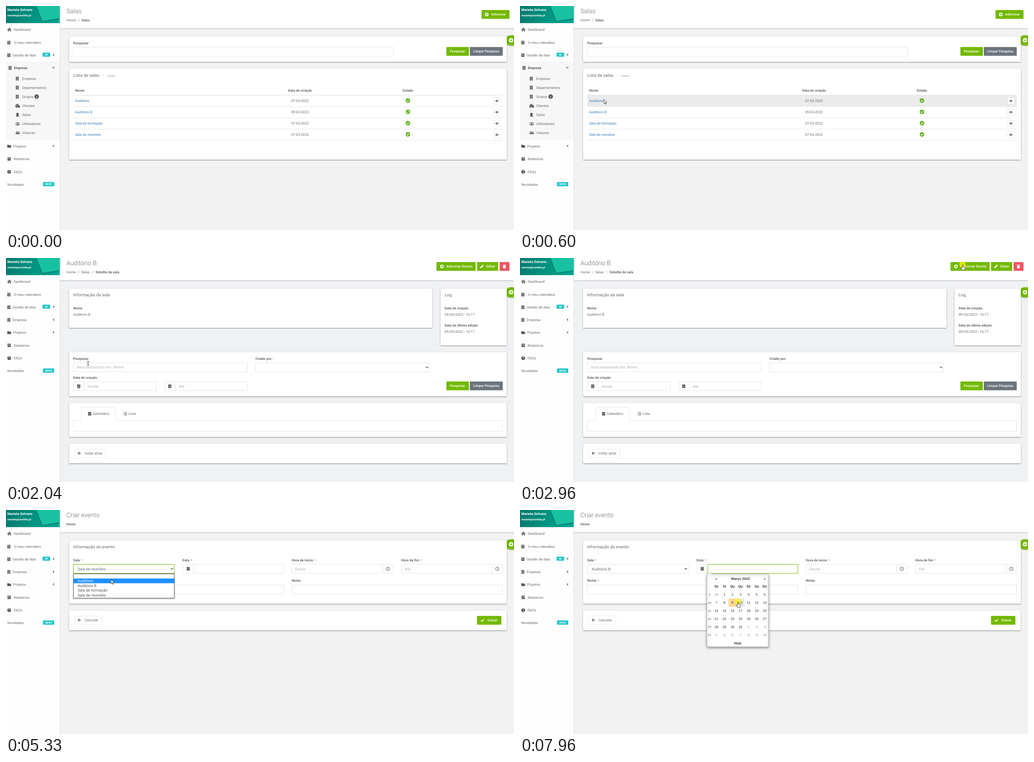
An HTML page with a canvas that plays this animation: 1127x497 px, repeating every 8 s.

```html
<!DOCTYPE html>
<html lang="pt">
<head>
<meta charset="utf-8">
<style>
html, body { margin: 0; width: 100%; height: 100%; overflow: hidden; background: #f2f2f2; }
canvas { display: block; }
</style>
</head>
<body>
<canvas id="stage" width="1127" height="497"></canvas>
<script>
const c = document.getElementById('stage').getContext('2d');
const LOOP = 8000;
const GREEN = '#73b900', TEAL = '#23c6c8', GREY = '#676a6c', DARK = '#55585b', EDGE = '#e4e5e7', HINT = '#b2b4b6';
const ROOMS = ['Auditório', 'Auditório B', 'Sala de formação', 'Sala de reuniões'];

// Icons are centred on 0,0
const ICONS = {
  home: 'M-5 .2L0-4.3 5 .2 4.2 1 0-2.8-4.2 1ZM-3.4 1.2L0-1.9 3.4 1.2V4.2H1V1.6H-1V4.2H-3.4Z',
  calendar: 'M-3.5-3.2H-2.4V-4.3H-1.2V-3.2H1.2V-4.3H2.4V-3.2H3.5V-1.6H-3.5ZM-3.5-1H3.5V4H-3.5ZM-2 .8V1.8H2V.8Z',
  days: 'M-3.5-3.2H-2.4V-4.3H-1.2V-3.2H1.2V-4.3H2.4V-3.2H3.5V-1.6H-3.5ZM-3.5-1H3.5V4H-3.5Z' +
    [-2.5, -.5, 1.5].map(x => `M${x} 0h1v1h-1zM${x} 2h1v1h-1z`).join(''),
  building: 'M-3.2 4.2V-4.2H3.2V4.2H.7V2.4H-.7V4.2Z' +
    [-3, -1, 1].map(y => `M-1.8 ${y}h1.2v1h-1.2zM.6 ${y}h1.2v1h-1.2z`).join(''),
  city: 'M-5 4V-2H-2.5V-4H1.5V-1H5V4ZM-3.8-.8v1h1v-1zM-3.8 1.4v1h1v-1zM-1-2.6v1h1v-1zM-1-.4v1h1v-1zM-1 1.8v1h1v-1zM2.6.6v1h1v-1z',
  door: 'M-3-4H2V3.2H4.5V4H-4.5V3.2H-3ZM.3-.5v1h1v-1z',
  users: 'M-1.6-2a1.6 1.6 0 1 0 3.2 0a1.6 1.6 0 1 0-3.2 0M-4.6-1.6a1.1 1.1 0 1 0 2.2 0a1.1 1.1 0 1 0-2.2 0M2.4-1.6a1.1 1.1 0 1 0 2.2 0a1.1 1.1 0 1 0-2.2 0M-2.8 3.5Q-2.6.3 0 .3T2.8 3.5ZM-5 2V.8Q-4 0-2.8.6L-3.3 2ZM5 2V.8Q4 0 2.8.6L3.3 2Z',
  car: 'M-4.5 0L-3.6-.6-2.6-3H2.6L3.6-.6 4.5 0V2.5H3.8V3.6H2.2V2.5H-2.2V3.6H-3.8V2.5H-4.5ZM-2.4-.6H2.4L1.8-2H-1.8ZM-3.4.6v.9h1.2v-.9zM2.2.6v.9h1.2v-.9z',
  folder: 'M-4.2-3H-.9L.2-1.9H4.2V3.2H-4.2Z',
  archive: 'M-4-3.6H4V-1.8H-4ZM-3.6-1.2H3.6V3.6H-3.6ZM-1.3-.5V.4H1.3V-.5Z',
  pencil: 'M-4 4L-3.5 1.4 1.2-3.3 3.3-1.2-1.4 3.5ZM1.8-3.9L2.6-4.5 4.5-2.6 3.9-1.8Z',
  trash: 'M-3.6-3.6H-1.2L-.7-4.2H.7L1.2-3.6H3.6V-2.6H-3.6ZM-3.1-2H3.1L2.7 4.2H-2.7Z',
  eye: 'M-4 0Q0-5 4 0Q0 5-4 0ZM-3-0Q0 3.6 3 0Q0-3.6-3 0ZM-1.3 0a1.3 1.3 0 1 0 2.6 0a1.3 1.3 0 1 0-2.6 0'
};
const LINES = {
  left: 'M1.3-2.4L-1.1 0 1.3 2.4', down: 'M-2.4-1.1L0 1.3 2.4-1.1',
  back: 'M3.4 0H-3M0-3L-3 0 0 3', check: 'M-3.5 .2L-1.2 2.5 3.5-2.3', tick: 'M-2.4 .1L-.7 1.8 2.4-1.5',
  plus: 'M-2.5 0H2.5M0-2.5V2.5', clock: 'M-4 0a4 4 0 1 0 8 0a4 4 0 1 0-8 0M0-2.3V.3L1.5 1.4',
  list: 'M-4-2.8H-2.7M-1.5-2.8H4M-4 0H-2.7M-1.5 0H4M-4 2.8H-2.7M-1.5 2.8H4'
};
const POINTERS = {
  arrow: 'M0 0V9.5L2.2 7.6 3.8 11 5.3 10.3 3.8 7H6.7Z',
  hand: 'M-1 .8Q0-.8 1 .8V4.4L4.4 5.2Q5.6 6 5.3 8L4.4 12H-1.5L-4 8.2Q-4 6.4-2.6 7L-1 8.2Z',
  beam: 'M-2.5-4.3Q0-4.3 0-3V3Q0 4.3-2.5 4.3M2.5-4.3Q0-4.3 0-3M0 3Q0 4.3 2.5 4.3'
};

function shape(d, x, y, fill, stroke, width = 1) {
  const p = new Path2D(d);
  c.save();
  c.translate(x, y);
  if (fill) { c.fillStyle = fill; c.fill(p, 'evenodd'); }
  if (stroke) { c.strokeStyle = stroke; c.lineWidth = width; c.stroke(p); }
  c.restore();
}
const icon = (name, x, y, color = DARK) => shape(ICONS[name], x, y, color);
const line = (name, x, y, color = DARK, width = 1.3) => shape(LINES[name], x, y, null, color, width);

function text(s, x, y, { size = 7.75, weight = 400, color = GREY, align = 'left', font = 'Roboto' } = {}) {
  c.font = `${weight} ${size}px ${font}, sans-serif`;
  c.textAlign = align;
  c.fillStyle = color;
  c.fillText(s, x, y + size * .355);
  return c.measureText(s).width;
}
const bold = (s, x, y, more) => text(s, x, y, { weight: 700, size: 7.6, ...more });
const field = (s, x, y, color = HINT) => text(s, x, y, { size: 8.5, color });

function rect(x0, y0, x1, y1, fill, stroke, radius = 0) {
  const o = stroke ? .5 : 0;
  c.beginPath();
  c.roundRect(x0 + o, y0 + o, x1 - x0 - 2 * o, y1 - y0 - 2 * o, radius);
  if (fill) { c.fillStyle = fill; c.fill(); }
  if (stroke) { c.strokeStyle = stroke; c.lineWidth = 1; c.stroke(); }
}
function dot(x, y, r, color) {
  c.beginPath();
  c.arc(x, y, r, 0, 7);
  c.fillStyle = color;
  c.fill();
}
function shadowed(color, blur, dy, draw) {
  c.save();
  c.shadowColor = color; c.shadowBlur = blur; c.shadowOffsetY = dy;
  draw();
  c.restore();
}
const card = (x0, y0, x1, y1) => shadowed('rgba(0,0,0,.45)', 2.5, 1, () => rect(x0, y0, x1, y1, '#fff', null, 1));
const input = (x0, y0, x1, y1, edge = EDGE) => rect(x0, y0, x1, y1, '#fff', edge);

function button(x0, y0, x1, label, textX, color = GREEN) {
  rect(x0, y0, x1, y0 + 19.5, color, null, 1.5);
  text(label, textX, y0 + 9.7, { color: '#fff', weight: 500, size: 7.65 });
}
function outlineButton(y, x1, label) {
  rect(152, y, x1, y + 20, '#fff', '#e7eaec', 1.5);
  line('back', 163, y + 9.7);
  text(label, 174, y + 9.7);
}
function plusCircle(x, y, r) {
  dot(x, y, r, '#fff');
  line('plus', x, y, GREEN);
}
function badge(s, x0, y0, x1, y1) {
  rect(x0, y0, x1, y1, TEAL, null, 1.5);
  bold(s, (x0 + x1) / 2, (y0 + y1) / 2, { size: 5.6, color: '#fff', align: 'center' });
}
function roundLetter(s, x, y, r) {
  dot(x, y, r, DARK);
  bold(s, x, y, { size: r * 1.5, color: '#fff', align: 'center' });
}

function userPanel() {
  const g = c.createLinearGradient(0, 0, 119, 38);
  g.addColorStop(0, '#00796c');
  g.addColorStop(.55, '#009583');
  g.addColorStop(1, '#00a693');
  rect(0, 0, 119, 38, g);
  shadowed('rgba(0,60,50,.5)', 4, 1, () => shape('M67-2H119V27L81 33Z', 0, 0, '#19c1a3'));
  bold('Marieta Solvano', 3, 8, { color: '#fff' });
  bold('marieta@vorbita.pt', 3, 20.5, { size: 6.1, color: '#fff' });
}

function sidebar(open) {
  rect(0, 0, 119, 497, '#fefefe');
  rect(119, 0, 120, 497, '#dedfe0');
  userPanel();
  icon('home', 7.5, 52); text('Dashboard', 17, 52);
  icon('calendar', 6.3, 81); text('O meu calendário', 17.5, 81);
  icon('calendar', 6.3, 109); text('Gestão de dias', 15, 109);
  badge('46', 81, 103.5, 98, 112.5);
  line('left', 105.5, 108);
  if (open) {
    rect(0, 123, 119, 297, '#f7f7f7');
    icon('building', 9, 137.5); bold('Empresa', 17.5, 137.5, { color: DARK });
    line('down', 105, 136.5);
    [['building', 'Empresa'], ['building', 'Departamentos'], ['building', 'Grupos'], ['city', 'Clientes'],
     ['door', 'Salas'], ['users', 'Utilizadores'], ['car', 'Viaturas']].forEach(([name, label], i) => {
      const y = 161.3 + 20 * i;
      icon(name, i < 3 ? 25 : 26, y);
      text(label, 36, y);
    });
    roundLetter('i', 68, 201, 5);
  } else {
    icon('building', 6.3, 137.5); text('Empresa', 15, 137.5);
    line('left', 105.5, 136.8);
  }
  const y = open ? 311 : 165.5;
  icon('folder', 7, y); text('Projetos', 16, y);
  line('left', 105.5, y - .5);
  icon('archive', 7, y + 28.3); text('Relatórios', 17, y + 28.3);
  roundLetter('?', 7, y + 56.8, 4.1); text("FAQ's", 17, y + 56.8);
  text('Novidades', 3, y + 85);
  badge('NOVO', 82, y + 79.5, 107, y + 89);
}

function frame(title, crumbs, open, bg) {
  rect(0, 0, 1127, 497, bg);
  shadowed('rgba(0,0,0,.22)', 3, 1, () => rect(120, -5, 1127, 49, '#fff'));
  sidebar(open);
  text(title, 134, 11.5, { size: 14, weight: 300 });
  crumbs.forEach(([s, x], i) => (i == crumbs.length - 1 ? bold : text)(s, x, 31.5));
  shadowed('rgba(0,0,0,.25)', 3, 1, () => rect(1108, 65, 1140, 87.5, GREEN, null, 11));
  plusCircle(1120.5, 76, 4.8);
}
const heading = (s, x, y) => text(s, x, y, { size: 9.5 });
function searchButtons(y) {
  button(977, y, 1027, 'Pesquisar', 984.5);
  button(1029, y, 1102, 'Limpar Pesquisa', 1036.5, '#6c757d');
}

function listPage(mouse) {
  frame('Salas', [['Home', 134], ['/', 160], ['Salas', 167]], true, '#f2f2f2');
  button(1055, 9, 1117, 'Adicionar', 1076);
  plusCircle(1066.5, 18.7, 4);
  card(140, 68, 1111, 124);
  bold('Pesquisar', 149, 82);
  input(149, 91, 860, 112);
  searchButtons(91);
  card(140, 139, 1111, 341);
  heading('Lista de salas', 149, 153.5);
  dot(216, 154.5, .8, '#aaa');
  text('4 Salas', 223, 154.7, { size: 6, color: '#999' });
  bold('Nome', 153.5, 187);
  bold('Data de criação', 652.3, 187, { align: 'center' });
  bold('Estado', 891.7, 187, { align: 'center' });
  const hover = mouse ? Math.floor((mouse.y - 198) / 25) : -1;
  ROOMS.forEach((room, i) => {
    const y = 210.2 + 25 * i;
    if (i == hover) rect(149, 198 + 25 * i, 1102, 223 + 25 * i, '#ebebeb');
    text(room, 153.5, y, { color: '#337ab7' });
    text(i == 1 ? '09-03-2022' : '07-03-2022', 652.3, y, { align: 'center' });
    dot(891.7, y - .3, 5, '#62b01e');
    line('tick', 891.7, y - .3, '#fff', 1.4);
    rect(1081, y - 7, 1097, y + 8, '#fff', '#e7eaec', 1.5);
    icon('eye', 1089, y + .3, '#444');
  });
  for (let i = 0; i < 5; i++) rect(149, 197.5 + 25 * i, 1102, 198.5 + 25 * i, i ? '#e5e6e8' : '#d9dbdd');
}

function dateField(x0, x1, y, hint, edge = EDGE) {
  input(x0, y, x1, y + 21);
  rect(x0, y, x0 + 25, y + 21, '#fff', EDGE);
  if (edge != EDGE) rect(x0 + 24, y, x1, y + 21, null, edge);
  icon('days', x0 + 12.3, y + 10.5, '#444');
  field(hint, x0 + 32, y + 10.5);
}

function detailPage(complete) {
  frame('Auditório B', [['Home', 134], ['/', 167 - 7], ['Salas', 167], ['/', 191], ['Detalhe da sala', 199]], false,
    complete ? '#f0f1f3' : '#f2f2f2');
  button(955, 9, 1042, 'Adicionar Evento', 977);
  plusCircle(967, 18.7, 4);
  button(1045, 9, 1092, 'Editar', 1065.5);
  icon('pencil', 1056, 18.7, '#fff');
  button(1095, 9, 1117, '', 1100, '#ed5565');
  icon('trash', 1105.7, 18.7, '#fff');
  card(140, 68, 946, 155);
  heading('Informação da sala', 149, 82);
  bold('Nome', 149, 111.5);
  text('Auditório B', 149, 125.5);
  card(964, 68, 1111, 194);
  heading('Log', 973, 82);
  ['Data de criação', 'Data da última edição'].forEach((s, i) => {
    bold(s, 973, 111.5 + 38 * i);
    text('09/03/2022 - 16:17', 973, 125.5 + 38 * i);
  });
  card(140, 209, 1111, 307);
  bold('Pesquisar', 149, 223.5);
  input(149, 232, 536, 253);
  field('Será pesquisado em: Nome', 156.5, 242.3);
  bold('Criado por:', 553.5, 223.5);
  input(553, 232, 940, 253);
  line('down', 934, 242.3, '#444');
  bold('Data de criação', 149, 265.3);
  dateField(149, 334, 274, 'Desde');
  dateField(351, 536, 274, 'Até');
  searchButtons(274);
  card(140, 322, 1111, 397);
  input(149, 360, 1102, 385);
  rect(167, 331, 243, 362, '#fff', EDGE, 2);
  rect(168, 360, 242, 363, '#fff');
  icon('days', 185.5, 345.5, '#444');
  text('Calendário', 192, 345.5);
  line('list', 264.5, 345.5, '#444', 1.1);
  text('Lista', 271.5, 345.5);
  if (!complete) return;
  card(140, 412, 1111, 455.5);
  outlineButton(423.5, 222, 'Voltar atrás');
}

function required(label, x, y) {
  const w = bold(label, x, y);
  text('*', x + w + 3, y, { size: 6.5, color: '#c0392b' });
}
function timeField(x, hint) {
  input(x, 120, x + 226, 141);
  rect(x + 201, 120, x + 226, 141, '#fff', EDGE);
  field(hint, x + 7.5, 130.5);
  line('clock', x + 213, 130.5, DARK, 1);
}

function roomMenu(t) {
  const active = t < 5250 ? 3 : t < 5630 ? 0 : 1;
  shadowed('rgba(0,0,0,.3)', 3, 1, () => rect(149, 141, 374, 196, '#fff', '#666'));
  ROOMS.forEach((room, i) => {
    const y = 157 + 10.7 * i;
    if (i == active) rect(150, y - 5, 373.5, y + 5.6, '#1e90ff');
    field(room, 159, y, i == active ? '#fff' : '#555');
  });
}

function datePicker(mouse) {
  const put = (s, x, y, more) => text(s, x, y, { size: 7.6, color: '#333', align: 'center', font: '"Liberation Sans"', ...more });
  const colX = i => 435.7 + 17.87 * i, rowY = i => 187.5 + 17.9 * i;
  shadowed('rgba(0,0,0,.4)', 5, 2, () => rect(414, 142, 552, 304, '#fff', '#bbb', 2.5));
  shape('M417 143L421 139 425 143Z', 0, 0, '#fff', '#ccc', .6);
  rect(417, 142.6, 426, 144, '#fff');
  put('«', colX(0), 152, { weight: 700 });
  put('Março 2022', 489.3, 152, { weight: 700 });
  put('»', colX(6), 152, { weight: 700 });
  ['Se', 'Te', 'Qu', 'Qu', 'Se', 'Sa', 'Do'].forEach((s, i) => put(s, colX(i), 169.7, { weight: 700 }));
  for (let r = 0; r < 6; r++) {
    put(9 + r, 420.5, rowY(r) + .3, { size: 5.8 });
    for (let i = 0; i < 7; i++) {
      const n = r * 7 + i, x = colX(i), y = rowY(r);
      const over = mouse.y > 178 && Math.abs(mouse.x - x) < 8.9 && Math.abs(mouse.y - y) < 8.95;
      if (n == 9) rect(x - 9, y - 9, x + 9, y + 9, '#ffd898', null, 1.5);
      else if (over) rect(x - 9, y - 9, x + 9, y + 9, '#e9e9ec', null, 1.5);
      put(n < 1 ? 28 : n > 31 ? n - 31 : n, x, y, { color: n < 1 ? '#999' : n > 31 ? '#7f9c9c' : '#333' });
    }
  }
  put('Hoje', 483, 295, { weight: 700 });
}

function eventPage(t, mouse) {
  const picking = t >= 6870;
  const selectEdge = t >= 4460 && t < 6870 ? GREEN : picking && t < 7030 ? '#bfdc95' : EDGE;
  frame('Criar evento', [['Home', 134]], false, '#f2f2f2');
  card(140, 68, 1111, 208);
  heading('Informação do evento', 149, 82);
  [['Sala', 149], ['Data', 391.5], ['Hora de início', 634], ['Hora de fim', 877]].forEach(([s, x]) => required(s, x, 111.5));
  input(149, 120, 374, 141, selectEdge);
  field(t < 6090 ? 'Sala de reuniões' : 'Auditório B', 159, 130.5, GREY);
  line('down', 368, 130.3, '#444');
  dateField(392, 617, 120, '', picking ? GREEN : EDGE);
  timeField(634, 'Desde');
  timeField(877, 'Até');
  required('Nome', 149, 156.7);
  input(149, 166, 617, 187);
  bold('Notas', 634, 156.7);
  input(634, 166, 1102, 187);
  card(140, 223, 1111, 267);
  outlineButton(234.5, 213, 'Cancelar');
  button(1045, 235, 1099, 'Gravar', 1068);
  line('check', 1057, 244.5, '#fff', 1.7);
  if (t >= 4540 && t < 6090) roomMenu(t);
  if (picking) {
    if (t < 7400) rect(424, 125, 425, 136, '#333');
    datePicker(mouse);
  }
}

const TRACK = [[140, 215, 367], [215, 205, 285], [290, 198, 260], [460, 198, 258], [590, 186, 207], [780, 186, 207],
  [1080, 181, 234], [1950, 182, 234], [2060, 182, 234], [2730, 948, 22], [2810, 1022, 13], [2960, 982, 15], [3490, 982, 15],
  [3790, 341, 41], [3900, 341, 41], [4290, 245, 128], [4500, 240, 131], [5010, 239, 133], [5250, 234, 152], [5320, 233, 154],
  [5400, 233, 155], [5630, 231, 165], [6380, 231, 165], [6800, 441, 132], [7100, 441, 132], [7330, 462, 182],
  [7480, 486, 216], [7640, 484, 204], [8000, 484, 204]];
const KINDS = [[0, 'arrow'], [290, 'hand'], [460, 'arrow'], [1000, 'hand'], [1640, 'arrow'], [1950, 'beam'], [2110, 'arrow'],
  [2810, 'hand'], [3340, 'arrow'], [6720, 'beam'], [7180, 'hand']];
const CLICKS = [[1080, 1230], [2960, 3040], [4460, 4540], [6090, 6170], [6800, 6870], [7960, 8000]];

function mouseAt(t) {
  if (t < TRACK[0][0]) return null;
  const i = TRACK.findIndex(k => k[0] > t);
  const [t0, x0, y0] = TRACK[i - 1], [t1, x1, y1] = TRACK[i];
  const p = (t - t0) / (t1 - t0);
  return { x: x0 + (x1 - x0) * p, y: y0 + (y1 - y0) * p };
}

function pointer(t, { x, y }) {
  if (CLICKS.some(([from, to]) => t >= from && t < to)) dot(x - .5, y - .5, 7, 'rgba(255,242,20,.75)');
  const kind = KINDS.filter(k => k[0] <= t).pop()[1];
  if (kind == 'beam') shape(POINTERS.beam, x, y, null, '#333', 1);
  else shape(POINTERS[kind], x, y, '#fff', '#333', .9);
}

function draw(now) {
  const t = now % LOOP, mouse = mouseAt(t);
  c.textRendering = 'geometricPrecision';
  if (t < 1790) listPage(mouse);
  else if (t < 3490) detailPage(t >= 1950);
  else eventPage(t, mouse);
  if (mouse) pointer(t, mouse);
}

const start = performance.now();
(function tick() {
  draw(performance.now() - start);
  requestAnimationFrame(tick);
})();
</script>
</body>
</html>
```
